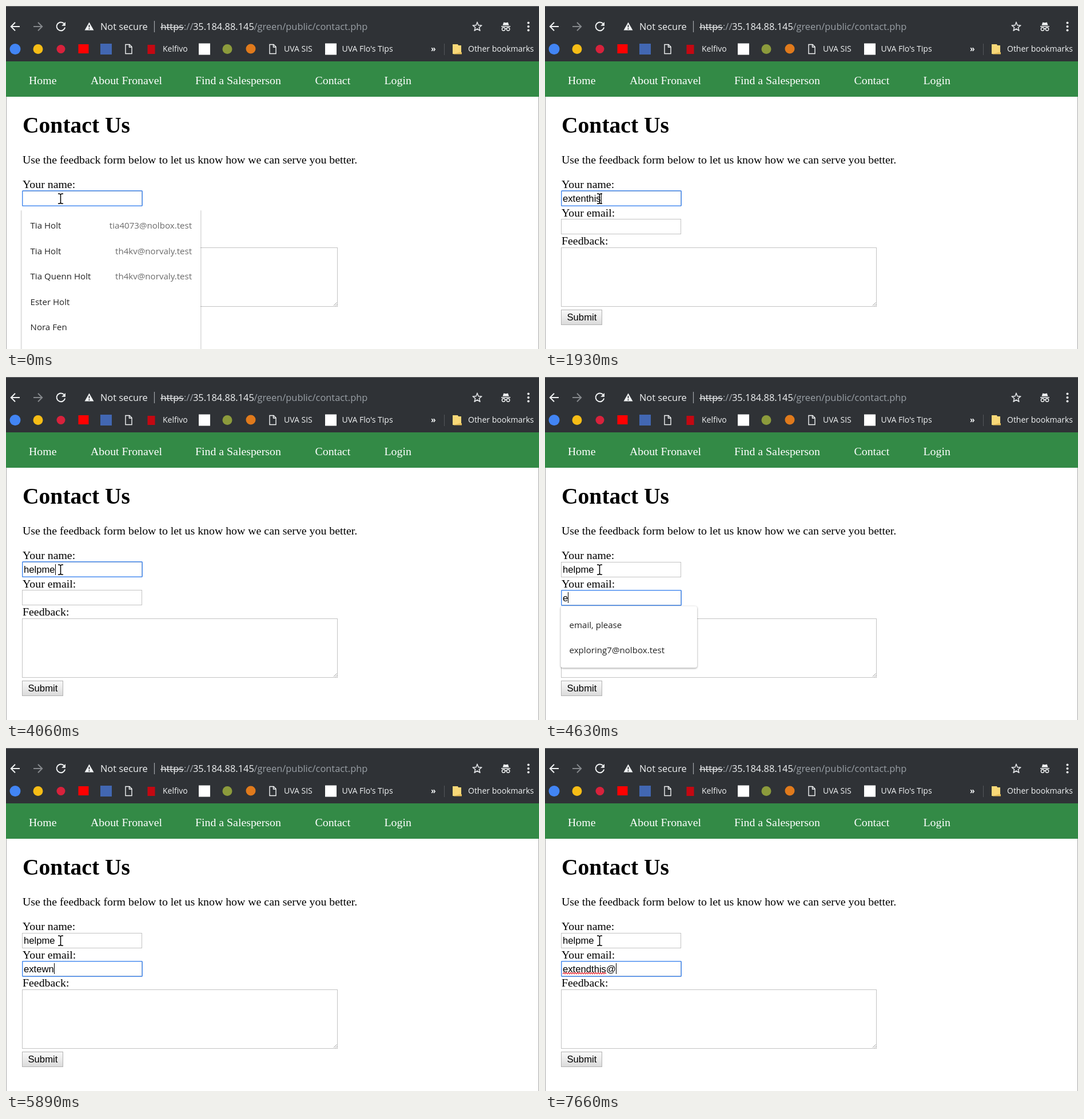
Animation of 932 by 601 pixels, one loop 8 s. Source, as an HTML page:

```html
<!DOCTYPE html>
<html lang="en">
<head>
<meta charset="utf-8">
<title>Contact form</title>
<style>
  html, body { margin: 0; width: 100%; height: 100%; overflow: hidden; background: #fff; }
  svg { display: block; }
  .ui { font-family: "Open Sans", "Noto Sans", sans-serif; }
  .url { font-size: 16.4px; }
  .mark { font-size: 14px; fill: #f1f3f4; }
  .page { font: 19.83px "Liberation Serif", "Times New Roman", serif; }
  .nav { fill: #fff; }
  .title { font-size: 39.6px; font-weight: bold; }
  .input { font: 16.667px "Liberation Sans", Arial, sans-serif; }
  .pop { font-size: 15.1px; fill: #222; }
  .pop rect { fill: #fff; }
  .pop .back { filter: drop-shadow(0 1px 1.5px rgba(0, 0, 0, .42)); }
  .pop .mail { fill: #6b6b6b; text-anchor: end; }
  .line { fill: none; stroke-width: 2; }
  .box { fill: #fff; stroke: #c3c3c3; }
  .ring { fill: none; stroke: #4a8df0; stroke-width: 1.5; }
</style>
</head>
<body>
<svg width="932" height="601" viewBox="0 0 932 601">
  <defs>
    <linearGradient id="face" x2="0" y2="1">
      <stop stop-color="#f8f8f8"/><stop offset=".4" stop-color="#eee"/><stop offset="1" stop-color="#dadada"/>
    </linearGradient>
    <path id="doc" d="M-5.5 -8H1.5L5.5 -4V8H-5.5ZM1 -8V-3.5H5.5" fill="none" stroke="#f1f3f4" stroke-width="1.4"/>
  </defs>

  <rect width="932" height="601" fill="#fff"/>
  <rect width="932" height="97" fill="#2f3236"/>
  <rect width="932" height="1" fill="#707274"/>
  <rect y="97" width="932" height="62" fill="#338a46"/>
  <path d="M.5 159V601M931.5 159V601" stroke="#a9a9a9"/>

  <!-- toolbar -->
  <g class="line" stroke="#f1f3f4">
    <path d="M24 36H9.5M16 28.8L8.8 36L16 43.2"/>
    <path d="M48 36H62.5M56 28.8L63.2 36L56 43.2" stroke="#85888c"/>
    <path d="M101.5 30.8A7.4 7.4 0 1 0 103.2 37.6"/>
    <path d="M104 28V34.8H97.2Z" fill="#f1f3f4" stroke="none"/>
    <path d="M145.5 28.5L153.5 42.5H137.5Z" fill="#f1f3f4" stroke="none"/>
    <path d="M145.5 33V37.5M145.5 39V41" stroke="#2f3236" stroke-width="1.7"/>
    <path d="M259.5 26V46" stroke="#a4a7aa" stroke-width="1.2"/>
    <path id="star" stroke="#dfe1e4" stroke-width="1.6" stroke-linejoin="round"/>
  </g>
  <g fill="#f1f3f4">
    <path d="M866 35H882V36.5H866ZM868.5 33.8L870.3 28.5Q874 29.8 877.7 28.5L879.5 33.8Z"/>
    <g class="line" stroke="#f1f3f4">
      <circle cx="870" cy="40.5" r="2.7" stroke-width="1.4"/><circle cx="878" cy="40.5" r="2.7" stroke-width="1.4"/>
      <path d="M872.5 40Q874 39 875.5 40" stroke-width="1.3"/>
    </g>
    <circle cx="913.5" cy="29.5" r="2"/><circle cx="913.5" cy="36" r="2"/><circle cx="913.5" cy="42.5" r="2"/>
  </g>
  <g class="ui url" fill="#f1f3f4">
    <text x="165" y="42">Not secure</text>
    <text x="270.5" y="42">https</text>
    <text x="311" y="42" fill="#9aa0a6">://</text>
    <text x="327" y="42">35.184.88.145</text>
    <text x="433.5" y="42" fill="#9aa0a6">/green/public/contact.php</text>
    <path d="M270 37.5H311" stroke="#e0e2e4" stroke-width="1.3"/>
  </g>

  <!-- bookmarks -->
  <circle cx="16" cy="75.5" r="9.5" fill="#4285f4"/>
  <circle cx="56" cy="75.5" r="8.5" fill="#f6bd16"/>
  <circle cx="96" cy="75.5" r="7.5" fill="#d8223c"/>
  <rect x="126.5" y="67" width="18" height="16" fill="#f00"/>
  <rect x="165" y="66" width="20" height="19" fill="#4267b2"/>
  <use href="#doc" x="214.5" y="75.5"/>
  <rect x="247.5" y="68" width="13" height="16" fill="#c40812"/>
  <rect x="337" y="65.5" width="20" height="20" fill="#fff"/>
  <circle cx="387" cy="75.5" r="8.5" fill="#8c9b3c"/>
  <circle cx="428" cy="75" r="8.5" fill="#e07a1c"/>
  <use href="#doc" x="466.5" y="75.5"/>
  <rect x="558" y="65.5" width="20" height="20" fill="#fff"/>
  <path d="M766.5 66V86" stroke="#54575b"/>
  <path d="M781 67H790L791 69H796V84H781Z" fill="#f8d878"/>
  <path d="M793 81H797V84.5H782Z" fill="#e8c05c"/>
  <g class="ui mark">
    <text x="274" y="80">Kelfivo</text>
    <text x="486" y="80">UVA SIS</text>
    <text x="587.5" y="80">UVA Flo's Tips</text>
    <text x="743" y="80" font-weight="bold">»</text>
    <text x="808" y="80">Other bookmarks</text>
  </g>

  <!-- page -->
  <g class="page">
    <g class="nav">
      <text x="40" y="137">Home</text>
      <text x="148" y="137">About Fronavel</text>
      <text x="331" y="137">Find a Salesperson</text>
      <text x="540.5" y="137">Contact</text>
      <text x="661.5" y="137">Login</text>
    </g>
    <text class="title" x="29" y="222">Contact Us</text>
    <text x="29" y="276">Use the feedback form below to let us know how we can serve you better.</text>
    <text x="29" y="319">Your name:</text>
    <text x="29" y="369">Your email:</text>
    <text x="29" y="418">Feedback:</text>
  </g>
  <rect class="box" x="28.5" y="423.5" width="551" height="103"/>
  <path d="M573 525L578.5 519.5M576 525.5L579 522.5" stroke="#a0a0a0"/>
  <rect x="28.5" y="532.5" width="71" height="26" fill="url(#face)" stroke="#b2b2b2"/>
  <rect class="box" x="28.5" y="324.5" width="209" height="26"/>
  <rect class="box" x="28.5" y="373.5" width="209" height="26"/>
  <rect id="ring" class="ring" x="28.75" width="209.5" height="26.5" rx="1"/>
  <g class="input">
    <text x="38.5" y="551">Submit</text>
    <text id="name" x="31" y="343"/>
    <text id="mail" x="31" y="392.5"/>
  </g>
  <path id="wave" fill="none" stroke="#e8202c" stroke-width="1.2"/>
  <rect id="caret" width="1" height="19"/>

  <!-- suggestions -->
  <g id="people" class="ui pop">
    <rect class="back" x="27.5" y="356" width="312.5" height="270"/>
    <rect x="24" y="351" width="320" height="7"/>
  </g>
  <g id="mails" class="ui pop"><rect id="mailsBack" class="back" x="27.5" y="401.5" width="238.5" height="108" rx="4"/></g>

  <path d="M91 329H93.5Q95.5 329.3 95.5 331V344Q95.5 346 93.5 346.3H91M100 329H97.5Q95.5 329.3 95.5 331M95.5 344Q95.5 346 97.5 346.3H100" fill="none" stroke="#000" stroke-width="1.5"/>
</svg>
<script>
const LOOP = 8000, LEFT = 31, ROW = 44.6;
const $ = id => document.getElementById(id);

function addText(parent, str, x, y, cls) {
  const el = document.createElementNS("http://www.w3.org/2000/svg", "text");
  el.setAttribute("x", x);
  el.setAttribute("y", y);
  if (cls) el.setAttribute("class", cls);
  el.textContent = str;
  parent.append(el);
  return el;
}

[["Tia Holt", "tia4073@nolbox.test"], ["Tia Holt", "th4kv@norvaly.test"],
 ["Tia Quenn Holt", "th4kv@norvaly.test"], ["Ester Holt"], ["Nora Fen"]]
  .forEach(([who, mail], i) => {
    const y = 390 + i * ROW;
    addText($("people"), who, 42.5, y);
    if (mail) addText($("people"), mail, 325, y, "mail");
  });

const mailRows = ["email, please", "exploring7@nolbox.test"]
  .map((str, i) => addText($("mails"), str, 42.5, 439.5 + i * ROW));

let star = "";
for (let i = 0; i < 10; i++) {
  const r = i % 2 ? 3.5 : 8.3, a = i * Math.PI / 5;
  star += (i ? "L" : "M") + (824 + r * Math.sin(a)) + " " + (36.5 - r * Math.cos(a));
}
$("star").setAttribute("d", star + "Z");

let wave = "M31 396";
for (let x = 33, up = true; x <= 107; x += 2, up = !up) wave += `L${x} ${up ? 393.5 : 396}`;
$("wave").setAttribute("d", wave);

// time, focused field, its text, suggestion rows, caret hidden
const steps = [
  [0, "name", "", 5, true],
  [410, "name", "e"], [550, "name", "ex"], [800, "name", "ext"], [1080, "name", "exten"],
  [1640, "name", "extent"], [1790, "name", "extenth"], [1930, "name", "extenthis"],
  [2210, "name", "extenthi"], [2350, "name", "extent"], [2480, "name", "exten"],
  [2890, "name", "exten", 0, true],
  [3190, "name", "h"], [3500, "name", "he"], [3640, "name", "hel"], [3780, "name", "help"],
  [3920, "name", "helpm"], [4060, "name", "helpme"],
  [4200, "mail", ""], [4480, "mail", "e"], [4630, "mail", "e", 2], [4760, "mail", "ex", 2],
  [4900, "mail", "ex", 1], [5040, "mail", "ext", 1], [5180, "mail", "ext"], [5460, "mail", "exte"],
  [5740, "mail", "extew"], [5890, "mail", "extewn"], [6010, "mail", "extewndth"],
  [6160, "mail", "exte"], [6440, "mail", "exten"], [6720, "mail", "extend"],
  [6860, "mail", "extendt"], [7000, "mail", "extendth"], [7130, "mail", "extendthi"],
  [7260, "mail", "extendthis"], [7660, "mail", "extendthis@"]
];

const show = (el, on) => { el.style.display = on ? "" : "none"; };

function render([, field, text, rows = 0, noCaret = false]) {
  const onMail = field === "mail";
  $("name").textContent = onMail ? "helpme" : text;
  $("mail").textContent = onMail ? text : "";
  $("ring").setAttribute("y", onMail ? 373.75 : 323.75);

  const width = text ? $(field).getComputedTextLength() : 0;
  $("caret").setAttribute("x", Math.round(LEFT + width));
  $("caret").setAttribute("y", onMail ? 377 : 328);
  show($("caret"), !noCaret);
  show($("wave"), text.endsWith("@"));

  show($("people"), !onMail && rows);
  show($("mails"), onMail && rows);
  show(mailRows[0], rows === 2);
  mailRows[1].setAttribute("y", 439.5 + (rows === 2 ? ROW : 0));
  $("mailsBack").setAttribute("height", rows === 2 ? 108 : 108 - ROW);
}

const start = performance.now();
let shown;
function tick() {
  const t = (performance.now() - start) % LOOP;
  const step = steps.findLast(s => s[0] <= t);
  if (step !== shown) render(shown = step);
  requestAnimationFrame(tick);
}
tick();
</script>
</body>
</html>
```
